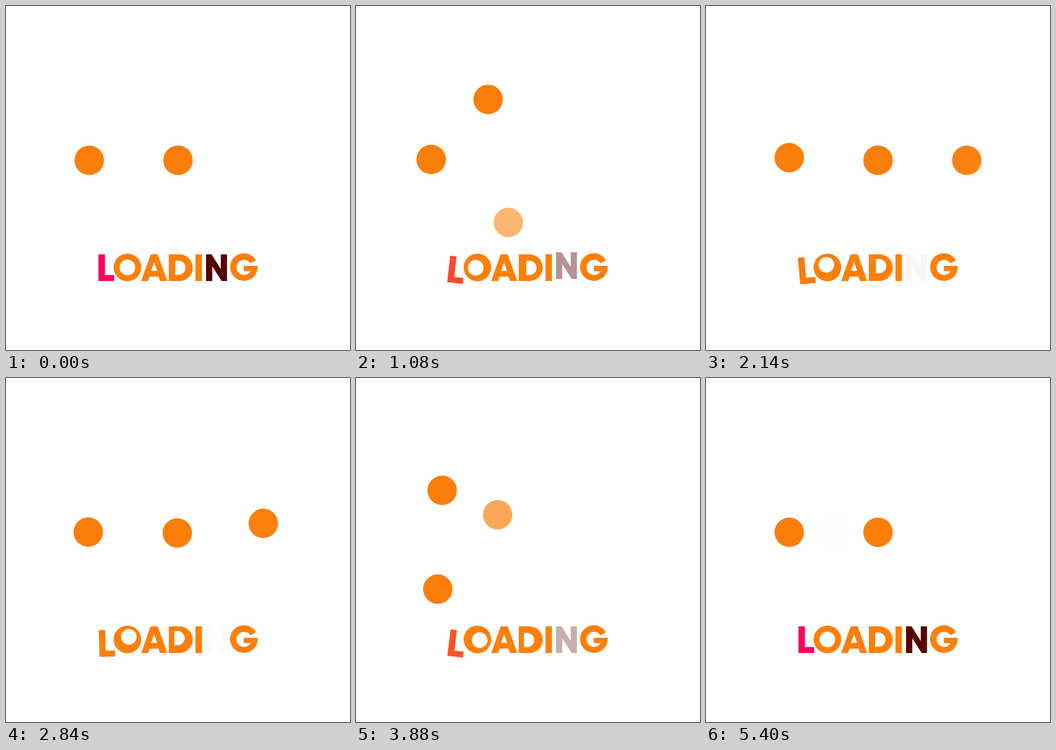
These frames come from a looping animation (748 by 748 pixels, 5.44 s). An HTML page:

```html
<!DOCTYPE html>
<html lang="en">
<head>
<meta charset="utf-8">
<title>Loading</title>
<style>
  html, body { margin: 0; width: 100%; height: 100%; overflow: hidden; background: #fff; }
  svg { display: block; width: 100vw; height: 100vh; }
  #word { fill: #fe7f09; }
  #balls { fill: #fb7e0a; }
  .hole { fill: #fff; }
</style>
</head>
<body>
<svg viewBox="0 0 748 748" role="img" aria-label="LOADING">
  <g id="word">
    <circle cx="264" cy="568.5" r="30"/>
    <circle class="hole" id="holeO" cx="264" cy="568.5" r="17"/>
    <path fill-rule="evenodd" d="M294 598 L314.5 540 H330 L350.5 598 H335 L331.7 588.5 H312.3 L309 598Z M322 556.5 L315.6 576 H328.6Z"/>
    <path d="M354 540 H377 A29 29 0 0 1 377 598 H354Z"/>
    <path class="hole" id="holeD" d="M368 553.5 H375 A15.5 15.5 0 0 1 375 584.5 H368Z"/>
    <path d="M412 540 H426 V598 H412Z"/>
    <path id="n" fill="#560000" d="M435 540 H447 L467 572 V540 H480.5 V598 H469 L448.5 566 V598 H435Z"/>
    <path d="M543.5 553 A30 30 0 1 0 547.2 565 H517 V576.5 H532 A16.5 16.5 0 1 1 531.5 559.5Z"/>
    <path id="l" d="M201 540 H215 V585 H235 V598 H201Z"/>
  </g>
  <g id="balls">
    <circle id="fader" r="32"/>
    <circle id="first" r="32"/>
    <circle id="second" r="32"/>
  </g>
</svg>
<script>
const LOOP = 5440;
const { PI, sin, cos, abs, max, min } = Math;
const el = id => document.getElementById(id);
const ease = u => (1 - cos(PI * max(0, min(1, u)))) / 2;

// Resting places of the balls.
const LEFT = [181, 335.5], RIGHT = [374, 335.5];
const NEAR = [277.5, 335.5], FAR = [567, 335.5];
const PERCH = [181, 280];

// One eased flight along a cubic curve.
const leg = (start, end, from, c1, c2, to) => ({ start, end, curve: [from, c1, c2, to] });

const flights = {
  first: [
    leg(10, 2015, LEFT, [150, 157], [385, 157], RIGHT),
    leg(2750, 4950, RIGHT, [253, 450], [53, 547], LEFT)
  ],
  second: [
    leg(0, 2000, RIGHT, [345, 341], [-27, 351], PERCH),
    leg(2000, 2200, PERCH, PERCH, LEFT, LEFT),
    leg(2750, 4950, LEFT, [5, 293], [288, 141], RIGHT)
  ],
  fader: [
    leg(0, 2100, NEAR, [151, 403], [424, 619], FAR),
    leg(2700, 4450, FAR, [410, -86], [300, 376], NEAR)
  ]
};

function place(legs, t) {
  const { start, end, curve: [a, b, c, d] } = legs.findLast(g => t >= g.start) || legs[0];
  const s = ease((t - start) / (end - start)), r = 1 - s;
  return [0, 1].map(k =>
    r * r * r * a[k] + 3 * r * r * s * b[k] + 3 * r * s * s * c[k] + s * s * s * d[k]);
}

// Rocking of the L between a few angles.
const rocks = [[0, 0], [900, 7], [2150, -5.3], [4000, 7], [5060, 0], [LOOP, 0]];
function rock(t) {
  const i = rocks.findIndex(([end]) => end > t);
  const [t0, a0] = rocks[i - 1], [t1, a1] = rocks[i];
  return a0 + (a1 - a0) * ease((t - t0) / (t1 - t0));
}

const PINK = [255, 0, 92], ORANGE = [254, 127, 9];
const mix = k => `rgb(${PINK.map((p, i) => Math.round(p + (ORANGE[i] - p) * k))})`;
const move = (id, [x, y], turn = "") =>
  el(id).setAttribute("transform", `translate(${x} ${y}) ${turn}`);

function draw() {
  const t = performance.now() % LOOP, p = t / LOOP;
  const shown = sin(PI * p ** 0.92) ** 1.3;

  for (const id in flights) move(id, place(flights[id], t));
  el("fader").setAttribute("opacity", shown);

  const sink = sin(PI * max(0, min(1, (t - 600) / 4500)));
  move("l", [1.5 * sink, 8.3 * sink], `rotate(${rock(t)} 201 569)`);
  el("l").setAttribute("fill", mix(shown));

  // The counters of O and D circle in mirrored spirals.
  const angle = PI / 2 + 7 * p, radius = 6.5 * sin(PI * p);
  const dx = radius * cos(angle), dy = radius * sin(angle);
  move("holeO", [dx, dy]);
  move("holeD", [-0.6 * dx, 0.6 * dy]);

  // The N hops twice, evenly around the middle of the loop.
  const hop = max(0, cos((abs(t - 2580) - 1920) / 600 * PI / 2));
  move("n", [0, -10 * hop]);
  el("n").setAttribute("opacity", 1 - shown);
  requestAnimationFrame(draw);
}
draw();
</script>
</body>
</html>
```
